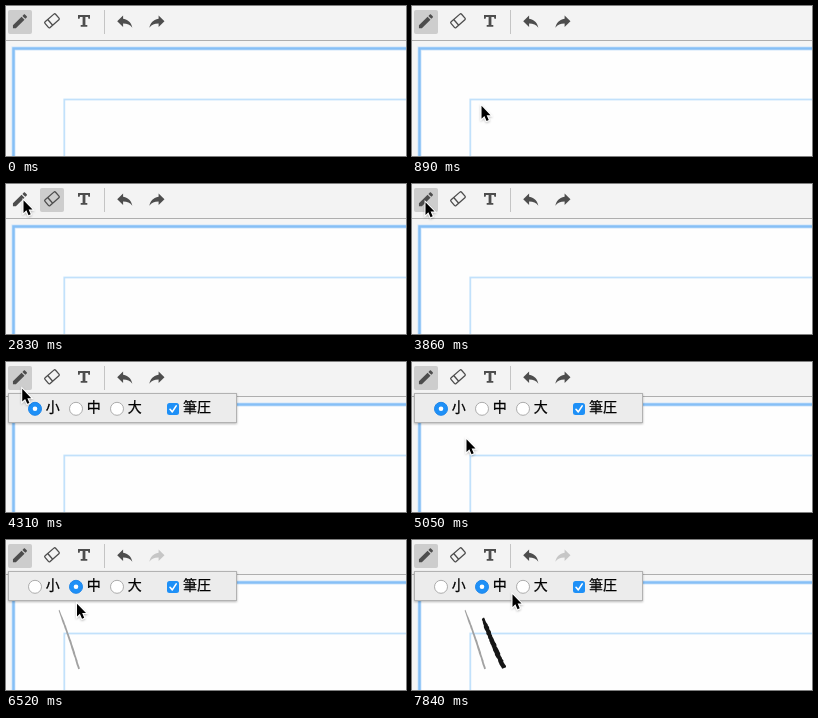
Write an HTML page that moves like this. It is 400x150 px and loops after 7990 ms.

```html
<!DOCTYPE html>
<html lang="ja">
<head>
<meta charset="utf-8">
<style>
html, body { margin: 0; width: 100%; height: 100%; overflow: hidden; background: #fefefe; }
svg { display: block; }
text { font: 14px "Noto Sans CJK JP", "Noto Sans CJK", sans-serif; fill: #000; stroke: #000; stroke-width: .25px; }
</style>
</head>
<body>
<svg width="400" height="150" viewBox="0 0 400 150">
  <defs>
    <path id="arrow" d="M10 9V5l-7 7 7 7v-4.1c5 0 8.5 1.6 11 5.1-1-5-4-10-11-11z"/>
    <filter id="shadow" x="-5%" y="-30%" width="110%" height="170%">
      <feDropShadow dx="0" dy="1" stdDeviation="1.3" flood-opacity=".28"/>
    </filter>
    <filter id="soft" x="-30%" y="-30%" width="170%" height="170%">
      <feDropShadow dx="0" dy="1" stdDeviation=".8" flood-opacity=".3"/>
    </filter>
  </defs>

  <rect width="400" height="150" fill="#f5f5f5"/>
  <g fill="none">
    <rect x="7.5" y="42.5" width="420" height="140" fill="#fefefe" stroke="#cfe6fc" stroke-width="4"/>
    <rect x="7.5" y="42.5" width="420" height="140" stroke="#86bff6" stroke-width="2.4"/>
    <rect x="58.3" y="93.5" width="420" height="140" stroke="#c2e1fb" stroke-width="1.8"/>
  </g>

  <rect width="400" height="35" fill="#f3f3f3"/>
  <path d="M0 34.5H400" stroke="#aeaeae"/>
  <path d="M98.5 4V28" stroke="#c4c4c4"/>
  <rect id="highlight" y="4" width="24" height="24" rx="2" fill="#cdcdcd"/>
  <g fill="#4d4d4d">
    <path transform="translate(4.6 5.9) scale(.78)" d="M3 17.25V21h3.75L17.81 9.94l-3.75-3.75L3 17.25zM20.71 7.04c.39-.39.39-1.02 0-1.41l-2.34-2.34c-.39-.39-1.02-.39-1.41 0l-1.83 1.83 3.75 3.75 1.83-1.83z"/>
    <g transform="translate(46 14.8) rotate(-41)" fill="none" stroke="#4d4d4d" stroke-width="1.3">
      <rect x="-7" y="-3.8" width="14" height="7.6" rx="1.2"/>
      <path d="M-2.4 -3.8V3.8"/>
    </g>
    <path d="M72 9H84V12.8H82.4L82 11H79.4V19.1H81.3V20.8H74.7V19.1H76.6V11H74L73.6 12.8H72Z"/>
    <use href="#arrow" transform="translate(108.7 5.4) scale(.84 .82)"/>
    <use id="redo" href="#arrow" transform="translate(161 5.4) scale(-.84 .82)"/>
  </g>

  <g id="strokes"></g>

  <g id="popup">
    <rect x="2.5" y="31.5" width="228" height="29" fill="#ececec" stroke="#b2b2b2" filter="url(#shadow)"/>
    <g id="radios"></g>
    <rect x="161" y="41" width="12" height="12" rx="2.5" fill="#1e90f7"/>
    <path d="M164 47.3L166.3 49.9 170.2 43.9" fill="none" stroke="#fff" stroke-width="1.6" stroke-linecap="round" stroke-linejoin="round"/>
    <text x="177" y="50.4">筆圧</text>
  </g>

  <g id="cursor" filter="url(#soft)">
    <path transform="translate(.5 1.2) scale(.9)" d="M0 0V14.2L3.2 11.3 5.6 16.7 8 15.7 5.7 10.4H10Z" stroke="#fff" stroke-width="2" paint-order="stroke"/>
  </g>
</svg>

<script>
const LOOP = 7990, START = 449, STEP = 147.8, LAST = 50;
const ERASER = 13, PENCIL = 18, OPEN = 24, MEDIUM = 40;
const $ = id => document.getElementById(id);

function add(parent, tag, attrs, text = '') {
  const el = document.createElementNS('http://www.w3.org/2000/svg', tag);
  for (const key in attrs) el.setAttribute(key, attrs[key]);
  el.textContent = text;
  return parent.appendChild(el);
}

const radios = ['小', '中', '大'].map((label, i) => {
  const x = 29 + 41 * i;
  const ring = add($('radios'), 'circle', { cx: x, cy: 46.8, r: 6.5 });
  const dot = add($('radios'), 'circle', { cx: x, cy: 46.8, r: 2.3, fill: '#fff' });
  add($('radios'), 'text', { x: x + 10.7, y: 50.4 }, label);
  return { ring, dot };
});

// Places the pointer visits
const spot = {
  entry: [76, 119], toolbar: [39, 11], gap: [29, 16], eraser: [44, 19],
  pencil: [17, 15], press: [13, 22], hover: [13, 17], page: [54, 76], medium: [70, 47],
  start1: [53, 70], end1: [73, 129], start2: [71, 78], end2: [92, 128], exit: [100, 53]
};

const moves = [
  { from: 0, to: 7, a: spot.entry, b: spot.toolbar },
  { from: 7, to: 9, a: spot.toolbar, b: spot.gap },
  { from: 9, to: ERASER, a: spot.gap, b: spot.eraser },
  { from: ERASER, to: 16, a: spot.eraser, b: spot.pencil },
  { from: 16, to: 19, a: spot.pencil, b: spot.press },
  { from: 20, to: 23, a: spot.press, b: spot.hover },
  { from: 23, to: OPEN, a: spot.hover, b: spot.press },
  { from: 25, to: 31, a: spot.press, b: spot.page },
  { from: 31, to: 34, a: spot.page, b: spot.start1 },
  { from: 34, to: 37, a: spot.start1, b: spot.end1 },
  { from: 37, to: 39, a: spot.end1, b: spot.medium },
  { from: MEDIUM, to: 42, a: spot.medium, b: spot.start2 },
  { from: 42, to: 45, a: spot.start2, b: spot.end2 },
  { from: 45, to: LAST, a: spot.end2, b: spot.exit }
];

const pens = [
  { from: 34, to: 37, a: spot.start1, b: spot.end1, color: '#a2a2a2', width: 1.5, bow: .6, rough: .3 },
  { from: 42, to: 45, a: spot.start2, b: spot.end2, color: '#161616', width: 3.7, bow: -.7, rough: .9 }
];
for (const pen of pens) pen.el = add($('strokes'), 'path', { fill: pen.color });

const mix = (a, b, u) => a.map((v, i) => v + (b[i] - v) * u);
const progress = (span, step) => Math.max(0, Math.min(1, (step - span.from) / (span.to - span.from)));
const ease = u => (1 - Math.cos(Math.PI * u)) / 2;
const noise = n => (Math.sin(n * 12.9898) * 43758.5453 % 1 + 1) % 1 - .5;

function pointerAt(step) {
  const move = moves.findLast(m => m.from <= step) || moves[0];
  return mix(move.a, move.b, ease(progress(move, step)));
}

// Pressure-shaped line with slightly ragged edges
function ribbon({ a, b, width, bow, rough }, amount) {
  if (amount <= 0) return '';
  const count = 36, left = [], right = [];
  for (let i = 0; i <= count * amount; i++) {
    const u = i / count;
    const [x, y] = mix(a, b, u);
    const middle = x + bow * Math.sin(Math.PI * u);
    const half = width * (.3 + .3 * Math.min(1, u * 5));
    left.push(`${middle - half + rough * noise(i + 1)},${y + half * .35}`);
    right.unshift(`${middle + half + rough * noise(i + 70)},${y - half * .35}`);
  }
  return 'M' + [...left, ...right].join('L') + 'Z';
}

const show = (el, on) => el.setAttribute('display', on ? 'inline' : 'none');

function render(time) {
  const step = Math.min(LAST, Math.floor((time % LOOP - START) / STEP));
  $('cursor').setAttribute('transform', `translate(${pointerAt(step)})`);
  show($('cursor'), step >= 0);
  show($('popup'), step >= OPEN);
  $('highlight').setAttribute('x', step >= ERASER && step < PENCIL ? 34 : 2);
  $('redo').setAttribute('fill', step >= pens[0].to ? '#c6c6c6' : '#4d4d4d');

  const size = step >= MEDIUM ? 1 : 0;
  radios.forEach(({ ring, dot }, i) => {
    const on = i === size;
    ring.setAttribute('fill', on ? '#1e90f7' : '#fff');
    ring.setAttribute('stroke', on ? '#1e86ea' : '#acacac');
    show(dot, on);
  });
  for (const pen of pens) pen.el.setAttribute('d', ribbon(pen, ease(progress(pen, step))));
}

const origin = performance.now();
function tick() {
  render(performance.now() - origin);
  requestAnimationFrame(tick);
}
tick();
</script>
</body>
</html>
```
